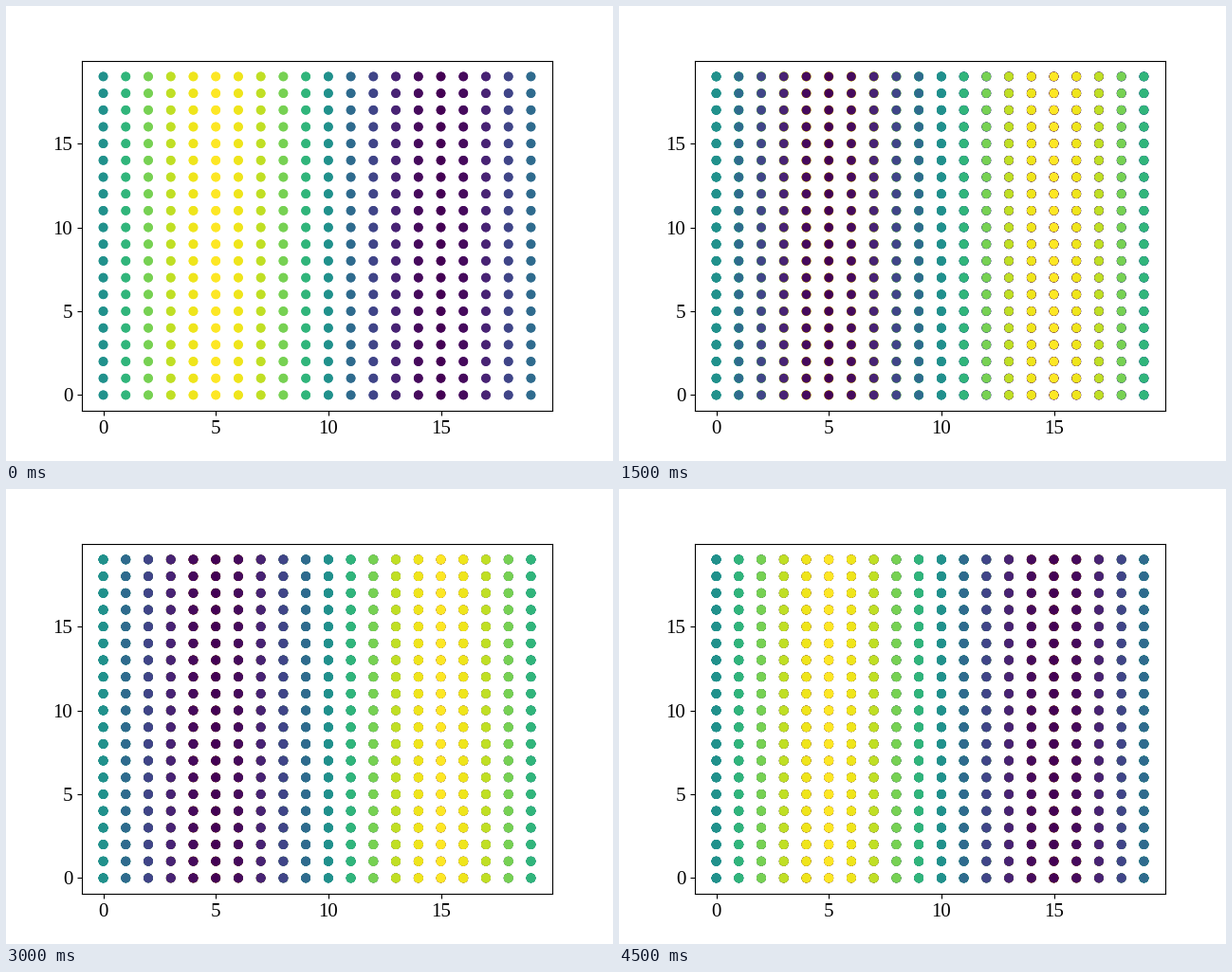
A matplotlib script that plays this animation: 640 by 480 pixels, repeating every 5000 ms.

```python
import numpy as np
import matplotlib.pyplot as plt
from matplotlib.animation import FuncAnimation

N = 20        # grid points per side
FRAMES = 10
STEP_MS = 500

plt.rcParams["font.family"] = "Liberation Serif"
plt.rcParams["font.size"] = 15

fig, ax = plt.subplots(figsize=(6.4, 4.8), dpi=100)
xs, ys = np.meshgrid(np.arange(N), np.arange(N))
phases = np.linspace(0, 2 * np.pi, FRAMES)


def add_layer(phase):
    """Scatter the standing wave; its colours are scaled to their own range."""
    wave = np.sin(2 * np.pi * xs / N) * np.cos(phase)
    return ax.scatter(xs, ys, c=wave, cmap="viridis")


# Layers pile up, so older colours stay visible at the rims of the dots.
add_layer(phases[0])
layers = [add_layer(p) for p in phases]

margin = 0.05 * (N - 1)
ax.set_xlim(-margin, N - 1 + margin)
ax.set_ylim(-margin, N - 1 + margin)
ax.set_xticks(range(0, N, 5))
ax.set_yticks(range(0, N, 5))


def update(i):
    for k, layer in enumerate(layers):
        layer.set_visible(k <= i)
    return layers


def reset():
    return update(0)


anim = FuncAnimation(fig, update, frames=FRAMES, init_func=reset,
                     interval=STEP_MS, repeat=True, repeat_delay=0)
plt.show()
```
